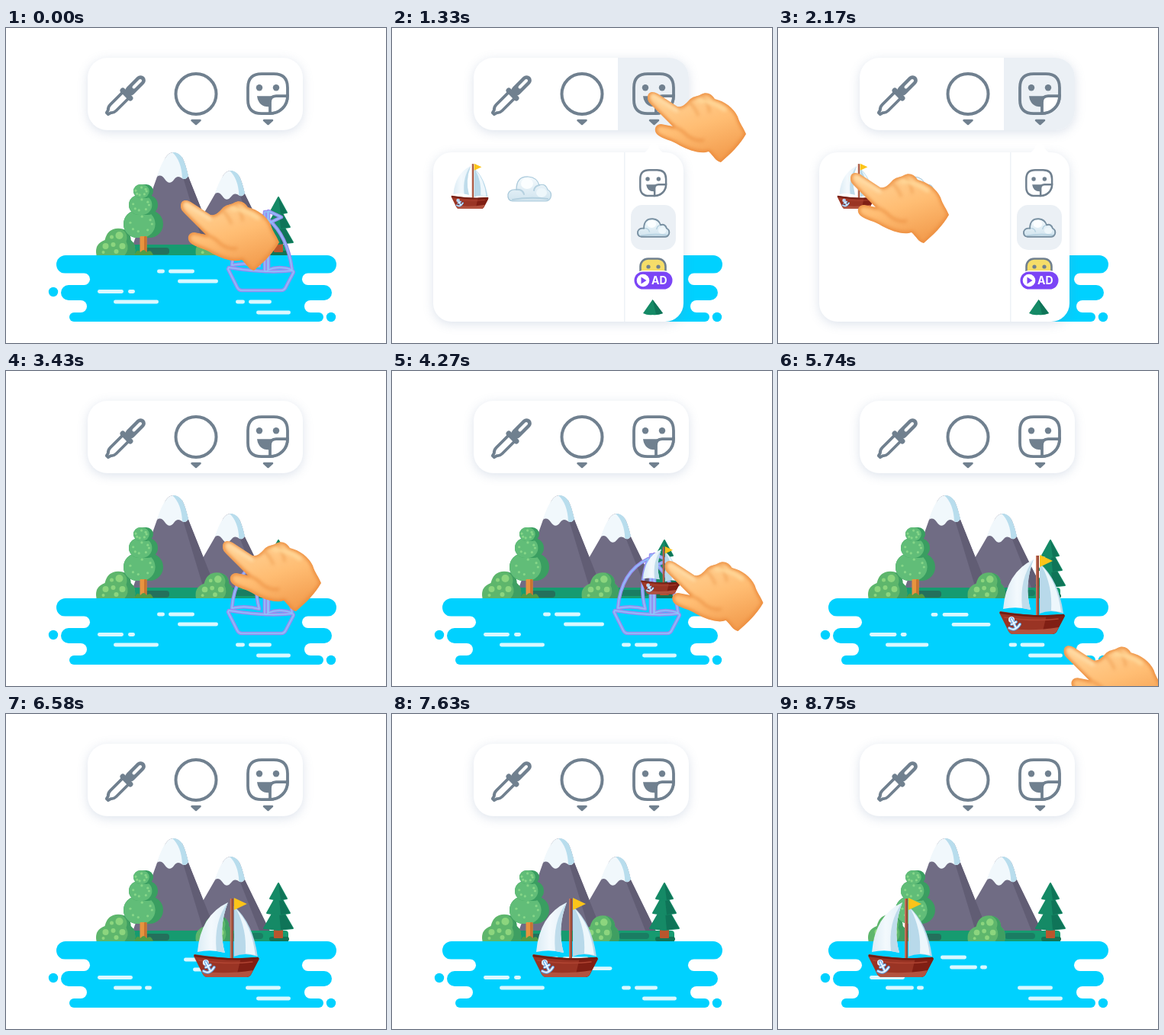
Animation of 498 by 413 pixels, one loop 8.96 s. Source, as an HTML page with a canvas:

```html
<!DOCTYPE html>
<html lang="en">
<head>
<meta charset="utf-8">
<title>Sticker editor</title>
<style>
html, body { margin: 0; width: 100%; height: 100%; overflow: hidden; background: #fff; }
canvas { display: block; width: 498px; height: 413px; }
</style>
</head>
<body>
<canvas id="stage"></canvas>
<script>
const W = 498, H = 413, LOOP = 8960, STEP = 70;
const GREY = '#70808f', TILE = '#ebf0f5', WATER = '#00d1ff';
const cv = document.getElementById('stage');
const c = cv.getContext('2d');
const dpr = window.devicePixelRatio || 1;
cv.width = W * dpr;
cv.height = H * dpr;

const clamp = v => Math.max(0, Math.min(1, v));
const ramp = (t, a, b) => { const k = clamp((t - a) / (b - a)); return k * k * (3 - 2 * k); };
const mix = (a, b, k) => a + (b - a) * k;

function fill(d, color) { c.fillStyle = color; c.fill(new Path2D(d)); }
function line(d, color, w) {
  c.strokeStyle = color; c.lineWidth = w; c.lineCap = c.lineJoin = 'round';
  c.stroke(new Path2D(d));
}
function disc(x, y, r, color, ry = r) {
  c.fillStyle = color; c.beginPath(); c.ellipse(x, y, r, ry, 0, 0, 7); c.fill();
}
function box(x, y, w, h, r, color) {
  c.fillStyle = color; c.beginPath(); c.roundRect(x, y, w, h, r); c.fill();
}
function at(x, y, s, draw) {
  c.save(); c.translate(x, y); c.scale(s, s); draw(); c.restore();
}
function shade(colors, x0, y0, x1, y1) {
  const g = c.createLinearGradient(x0, y0, x1, y1);
  colors.forEach((col, i) => g.addColorStop(i / (colors.length - 1), col));
  return g;
}

// Smooth curve through [time, ...values]; flat where a value is held.
function track(keys, t) {
  if (t <= keys[0][0]) return keys[0].slice(1);
  const n = keys.length - 1;
  if (t >= keys[n][0]) return keys[n].slice(1);
  let i = 0;
  while (keys[i + 1][0] <= t) i++;
  const a = keys[i], b = keys[i + 1], span = b[0] - a[0], u = (t - a[0]) / span;
  const slope = (j, k) => {
    if (j === 0 || j === n) return 0;
    const p = keys[j - 1], q = keys[j], r = keys[j + 1];
    if ((q[k] - p[k]) * (r[k] - q[k]) <= 0) return 0;
    return (r[k] - p[k]) / (r[0] - p[0]);
  };
  return a.slice(1).map((v, k) => {
    const w = b[k + 1], u2 = u * u, u3 = u2 * u;
    return v * (2 * u3 - 3 * u2 + 1) + w * (3 * u2 - 2 * u3) +
      span * (slope(i, k + 1) * (u3 - 2 * u2 + u) + slope(i + 1, k + 1) * (u3 - u2));
  });
}

const HAND = [
  [0, 229, 225], [140, 212, 229], [300, 226, 212], [740, 336, 68], [910, 335, 83],
  [1400, 335, 83], [1890, 130, 204], [2170, 95, 189], [2310, 72, 175], [2520, 92, 195],
  [2800, 92, 195], [3430, 284, 222], [3710, 343, 212], [4060, 364, 252], [4410, 350, 246],
  [4760, 328, 288], [4970, 310, 313], [5320, 290, 320], [5500, 290, 320], [6060, 505, 420]
];
const SHIP = [[4690, 356, 293, .6], [4970, 350, 321, .86], [5320, 340, 346, 1]];

function shadowCard(draw) {
  c.save();
  c.shadowColor = 'rgba(112,140,175,.24)';
  c.shadowBlur = 14 * dpr;
  c.shadowOffsetY = 3 * dpr;
  draw();
  c.restore();
}

function smiley() {
  line('M20 2 H36 Q54 2 54 20 V30 C54 44 44 54 30 54 H20 Q2 54 2 36 V20 Q2 2 20 2Z', GREY, 3.8);
  disc(17, 20, 4.2, GREY); disc(39, 20, 4.2, GREY);
  fill('M14 31 H43 Q42 45 29 45 Q16 45 14 31Z', GREY);
  fill('M31 54 V39 Q31 30 40 30 H54 C54 44 44 54 31 54Z', '#fff');
  line('M31 53 V39 Q31 31 39 31 H53', GREY, 3.8);
  line('M54 30 C54 44 44 54 30 54', GREY, 3.8);
}

function toolbar(glow) {
  shadowCard(() => box(107, 39, 282, 95, 26, '#fff'));
  if (glow > 0) {
    c.globalAlpha = glow;
    box(296, 39, 93, 95, [0, 26, 26, 0], TILE);
    c.globalAlpha = 1;
  }
  c.save();
  c.translate(155.5, 89.5);
  c.rotate(-.785);
  box(4, -6.5, 32, 13, 6.5, GREY);
  box(15, -2, 16, 4, 2, '#fff');
  line('M2 -5.5 H-21 Q-26 -5.5 -28 -2.5 L-32 -1.5 V1.5 L-28 2.5 Q-26 5.5 -21 5.5 H2', GREY, 3.8);
  box(0, -10.5, 7, 21, 3.5, GREY);
  c.restore();
  c.fillStyle = '#fff';
  c.strokeStyle = GREY; c.lineWidth = 4;
  c.beginPath(); c.arc(249, 86.5, 26.5, 0, 7); c.fill(); c.stroke();
  for (const x of [249, 343.5]) {
    const d = `M${x - 5.5} 121 h11 l-5.5 5 z`;
    fill(d, GREY); line(d, GREY, 2.5);
  }
  at(315, 58.2, 1, smiley);
}

function mountain(x, y, s, left, right) {
  at(x, y, s, () => {
    fill(`M-9 7 Q0 -7 13 7 Q17 14 21 32 L${right} 122 H${left} L-20 32Z`, '#706c84');
    fill(`M13 7 Q17 14 21 32 L${right} 122 H${right - 16} L15 36Z`, '#615d74');
    fill('M-9 7 Q0 -7 13 7 Q17 14 21 31 Q17 38 11 33 Q6 30 2 36 Q-4 44 -10 35 Q-15 28 -20 32 Q-16 17 -9 7Z', '#f1f8fc');
    fill('M0 0 Q8 -1 13 7 Q17 14 21 31 Q17 37 13 34 Q12 11 0 0Z', '#b8dded');
  });
}

function bush(x, s) {
  at(x, 298, s, () => {
    fill('M-25 0 Q-28 -15 -14 -20 Q-10 -37 7 -35 Q20 -32 20 -20 Q28 -14 25 0Z', '#5eb66c');
    fill('M7 -35 Q20 -32 20 -20 Q28 -14 25 0 H12 Q19 -8 14 -18 Q18 -29 7 -35Z', '#3f9f62');
    [[-13, -12, 4], [5, -26, 5], [-3, -14, 3], [9, -12, 4], [-16, -4, 2], [-5, -24, 2.5], [1, -5, 3]]
      .forEach(([a, b, r]) => disc(a, b, r, '#8cd57e'));
  });
}

function tree() {
  const tiers = [[214, 13, 9], [232, 19, 13], [257, 26, 18]].reverse();
  for (const [y, rx, ry] of tiers) {
    box(180 - rx, y - ry, 2 * rx, 2 * ry, ry, '#3a9e61');
    box(180 - rx, y - ry, 1.6 * rx, 2 * ry, ry, '#61bd78');
    for (let i = 0; i < 7; i++)
      disc(177 + Math.cos(i * 2.4) * rx * .55, y + Math.sin(i * 2.4) * ry * .55, 1.6, '#86d688');
  }
  box(175.5, 273, 9, 23, 1, '#e8943f');
  box(181, 273, 3.5, 23, 1, '#c97430');
  fill('M168 298 Q172 288 176 294 Q181 288 184 294 Q190 289 193 298Z', '#4f9c45');
}

function pine() {
  box(351, 280, 12, 14, 1, '#b9562d');
  for (const [y, top, half] of [[283, 248, 19], [263, 234, 15], [244, 222, 11]]) {
    const d = `M357 ${top} L${357 + half} ${y - 2} L357 ${y} L${357 - half} ${y - 2}Z`;
    fill(d, '#158a66'); line(d, '#158a66', 2);
    fill(`M357 ${top} L${357 + half} ${y - 2} L360 ${y}Z`, '#0f7458');
  }
}

function ripples(t) {
  const k = t < 5495 ? 0 : .5 + .5 * Math.cos(2 * Math.PI * (t - 6580) / 2170);
  const drift = ramp(t, 5495, 6580) * (1 - ramp(t, 6580, 8750));
  const bar = (a, b, y, dx = 0, dy = 0) => {
    if (b - a > 1) box(a + dx, y - 2.4 + dy, b - a, 4.8, 2.4, '#d9f8ff');
  };
  const dx = 20 * drift, dy = 3 * drift;
  bar(198, mix(208, 198, k), 319, dx, dy);
  bar(213, 247, 319, dx, dy);
  bar(225, mix(278, 261, k), 332, dx, dy);
  if (k > .2) bar(265, 274, 332, dx, dy);
  bar(120, mix(154, 166, k), 345.5);
  bar(mix(160, 166, k), mix(169, 166, k), 345.5);
  bar(141, mix(200, 178, k), 359);
  if (k > .4) bar(182, 191, 359);
  bar(mix(301, 314, k), mix(313, 314, k), 359);
  bar(mix(318, 314, k), mix(348, 360, k), 359);
  bar(328, 373, 373);
}

function scene(t) {
  mountain(293, 187, .95, -72, 65);
  mountain(218, 163, 1, -52, 57);
  box(160, 284, 210, 14, [6, 4, 0, 0], '#169b70');
  box(177, 288, 37, 9, 4, '#24705c');
  box(297, 287, 40, 8, 4, '#1a7d63');
  box(345, 292, 26, 6, 3, '#127455');
  pine();
  bush(143.5, 1);
  bush(273, .96);
  tree();
  c.fillStyle = WATER;
  c.fillRect(90, 298, 316, 87);
  box(66, 298, 367, 24, 12, WATER);
  box(72, 337, 355, 20, 10, WATER);
  box(83, 373, 333, 12, 6, WATER);
  box(30, 321.5, 80, 15.5, 7.7, '#fff');
  box(388, 321.5, 80, 15.5, 7.7, '#fff');
  box(30, 357, 76, 16, 8, '#fff');
  box(391, 357, 82, 16, 8, '#fff');
  disc(62, 346, 6.2, WATER);
  disc(426, 379, 6.2, WATER);
  ripples(t);
}

// Ship parts, with the origin at the foot of the mast.
const HULL = 'M-49 -31 Q0 -23 34 -27 Q37 -26 35 -23 L25 -4 Q23 -1 20 -1 H-32 Q-36 -1 -38 -5 L-50 -29Z';
const JIB = 'M-5 -99 Q-41 -82 -45 -34 Q-27 -38 -9 -33 Q-18 -65 -5 -99Z';
const MAIN = 'M3 -94 Q28 -72 34 -28 Q17 -34 3 -28Z';
const MAST = 'M-2 -104 H2 V-26 H-2Z';
const FLAG = 'M3 -105 L20 -97 L3 -89Z';

function ship() {
  const anchor = 'M-34 -21 L-28 -9 M-37 -9 Q-29 -4 -23 -14 M-34 -14 L-28 -17';
  fill(JIB, shade(['#dcecf5', '#f3f9fd', '#e6f2f9'], -45, 0, -9, 0));
  fill('M-5 -99 Q-24 -74 -20 -35 L-9 -33 Q-18 -65 -5 -99Z', '#bfdceb');
  fill(MAIN, '#b8d9ea');
  fill('M6 -90 Q26 -70 31 -30 L18 -32 Q20 -64 6 -90Z', '#edf7fc');
  fill(MAST, '#9c4a36');
  box(-2, -104, 1.6, 78, 0, '#c77861');
  fill(FLAG, '#fcc419');
  fill(HULL, '#9a3424');
  fill('M12 -26 L34 -27 Q37 -26 35 -23 L25 -4 Q23 -1 20 -1 H6Z', '#801f14');
  fill('M-40 -9 Q-10 -4 28 -10 L25 -4 Q23 -1 20 -1 H-32 Q-36 -1 -38 -5Z', '#b2523f');
  line('M-48 -29 Q0 -22 34 -26', '#6f1d13', 2.4);
  line('M-43 -23 Q-5 -17 27 -21', '#b04432', 1.5);
  disc(-34, -20, 4, '#deefff');
  line(anchor, '#5e9fe0', 4);
  line(anchor, '#e9f5ff', 2);
}

function outline() {
  for (const [color, w] of [['#998ef0', 4.6], ['#8fc4fa', 1.6]])
    for (const d of [JIB, MAIN, MAST, FLAG, HULL]) line(d, color, w);
}

const CLOUD = 'M-22 16 Q-29 15 -28 7 Q-26 0 -17 1 Q-17 -17 -1 -16 Q10 -15 13 -5 Q21 -8 24 1 Q30 4 28 11 Q26 16 21 16Z';

function cloud(edge, width) {
  fill(CLOUD, shade(['#f4fafd', '#cfe3ee'], 0, -16, 0, 17));
  disc(-3, -7, 8, '#fbfeff', 7);
  disc(16, 5, 7, '#eef7fb', 6);
  line('M-17 1 Q-9 0 -7 7 M13 -5 Q7 -4 6 2 M-22 14 Q0 10 24 13', '#b5d1e0', 2);
  line(CLOUD, edge, width);
}

function popup(k) {
  c.save();
  c.globalAlpha = k;
  c.translate(343, 150);
  c.scale(mix(.9, 1, k), mix(.9, 1, k));
  c.translate(-343, -150);
  shadowCard(() => box(54, 163, 328, 222, 24, '#fff'));
  fill('M329 164 Q335 162 338 154 Q343 147 348 154 Q351 162 357 164Z', '#fff');
  box(304, 163, 1.5, 222, 0, '#edf2f6');
  box(313, 232, 59, 59, 15, TILE);
  at(106, 237.5, .57, ship);
  at(180, 211, 1, () => cloud('#a9c9db', 1.2));
  at(324, 185, .65, smiley);
  at(342.5, 262, .73, () => cloud('#7890a2', 2.6));
  box(325.5, 302.5, 33, 32, 10, '#f5dd69');
  c.strokeStyle = GREY; c.lineWidth = 2.6;
  c.beginPath(); c.roundRect(325.5, 302.5, 33, 32, 10); c.stroke();
  disc(336, 313, 2.6, GREY); disc(349, 313, 2.6, GREY);
  box(316, 318, 53, 26, 13, '#fff');
  box(317.5, 319.5, 50, 23, 11.5, '#7b45f6');
  disc(329, 331, 8.3, '#fff');
  fill('M326.5 326.5 L333.5 331 L326.5 335.5Z', '#7b45f6');
  c.fillStyle = '#fff';
  c.font = '700 14px Inter, "Open Sans", sans-serif';
  c.fillText('AD', 340, 336);
  fill('M341.5 356 L355 374 Q348 377 341.5 376 Q335 377 329 374Z', '#158a66');
  fill('M341.5 356 L355 374 Q350 376 346 375Z', '#0f7458');
  c.restore();
}

function hand() {
  const d = 'M0 8 C0 1 6 -1 13 3 L39 20 C46 21 49 17 54 12 C59 6 65 7 70 4 C77 0 84 3 88 10 C101 13 113 22 118 33 C121 43 126 48 129 56 C121 70 109 82 96 93 C89 92 86 84 80 79 C69 83 54 77 42 71 C32 64 20 63 13 57 C7 51 10 43 18 43 L33 46 L5 18 C1 14 0 12 0 8Z';
  c.save();
  c.clip(new Path2D(d));
  fill(d, shade(['#ffd092', '#ffbd73', '#f4a052'], 45, 5, 72, 90));
  c.filter = 'blur(2px)';
  line(d, '#ec8d3f', 5);
  line('M33 46 Q45 50 52 58 Q63 66 73 64', '#ee9548', 3);
  line('M54 14 Q62 20 66 31 M72 7 Q80 16 81 27', '#f3a65c', 3);
  line('M7 6 L38 25', '#ffdca6', 5);
  line('M67 12 Q86 13 101 24', '#ffd899', 5);
  c.filter = 'none';
  c.restore();
}

function draw(t) {
  c.setTransform(dpr, 0, 0, dpr, 0, 0);
  c.fillStyle = '#fff';
  c.fillRect(0, 0, W, H);
  scene(t);
  if (t < 5390) at(341, 345, 1, outline);
  if (t >= 3710) {
    const [x, y, s] = track(SHIP, t);
    const sail = 172 * clamp((t - 5830) / 2920);
    at(x - sail, y, s * ramp(t, 3640, 3920), ship);
  }
  const closing = 1 - ramp(t, 2800, 3080);
  toolbar(t >= 980 ? closing : 0);
  const open = ramp(t, 910, 1190) * closing;
  if (open > 0) popup(open);
  if (t < 6060) {
    const [x, y] = track(HAND, t);
    at(x, y, 1, hand);
  }
}

const start = performance.now();
function tick() {
  const t = (performance.now() - start) % LOOP;
  draw(Math.min(8750, Math.floor(t / STEP) * STEP));
  requestAnimationFrame(tick);
}
tick();
</script>
</body>
</html>
```
